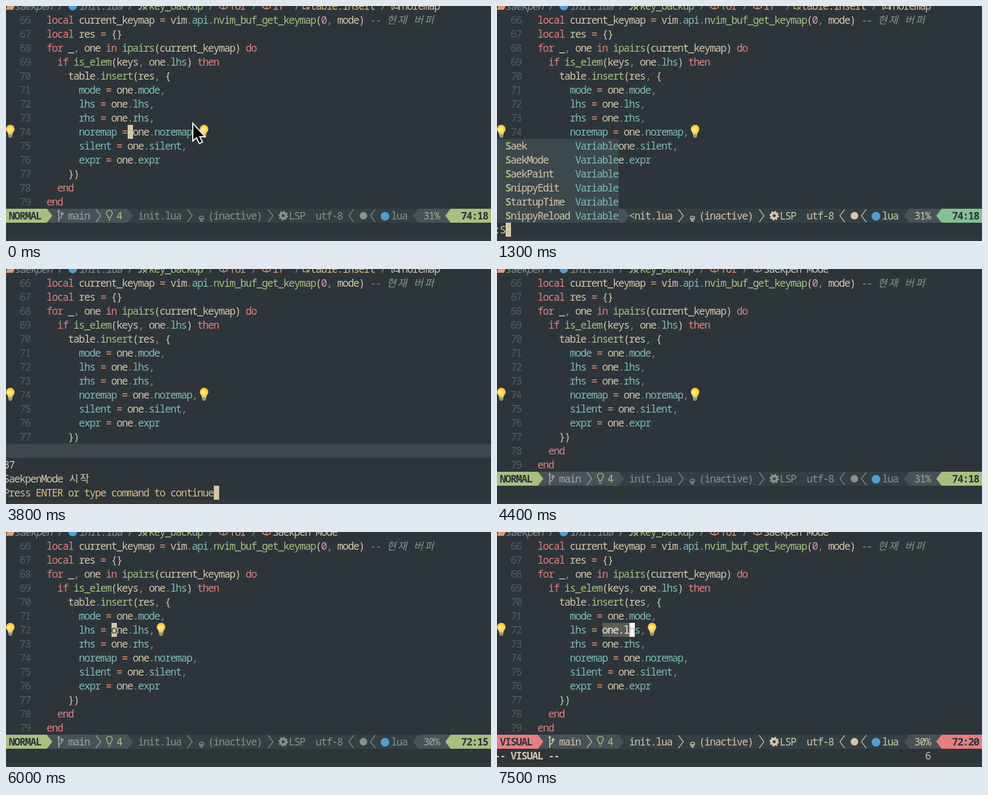
Recreate the animation shown at these times as an HTML page with a canvas. Size 901x437 px, loop 8 s.

```html
<!DOCTYPE html>
<html lang="en">
<head>
<meta charset="utf-8">
<title>Editor session</title>
<style>
  html, body { margin: 0; width: 100%; height: 100%; overflow: hidden; background: #2d353b; }
  canvas { display: block; }
</style>
</head>
<body>
<canvas id="stage" width="901" height="437"></canvas>
<script>
const LOOP = 8000, CELL = 10, ROW = 26, STATUS = 377, CMD = 403;
const C = {
  bg: '#2d353b', bar: '#343f44', panel: '#3d484d', section: '#475258', strip: '#343a3b',
  fg: '#d3c6aa', red: '#e67e80', orange: '#e69875', yellow: '#dbbc7f', green: '#a7c080',
  aqua: '#83c092', blue: '#7fbbb3', purple: '#d699b6', grey: '#859289', soft: '#9da9a0',
  number: '#525c62', moon: '#519fd0', select: '#5b5d57'
};
const ACCENT = { NORMAL: C.green, COMMAND: C.aqua, VISUAL: C.red };

const FIRST = 66;
const CODE = [
  '  local current_keymap = vim.api.nvim_buf_get_keymap(0, mode) -- 현재 버퍼',
  '  local res = {}',
  '  for _, one in ipairs(current_keymap) do',
  '    if is_elem(keys, one.lhs) then',
  '      table.insert(res, {',
  '        mode = one.mode,',
  '        lhs = one.lhs,',
  '        rhs = one.rhs,',
  '        noremap = one.noremap,',
  '        silent = one.silent,',
  '        expr = one.expr',
  '      })',
  '    end',
  '  end'
];
const MENU = {
  S: ['Saek', 'SaekMode', 'SaekPaint', 'SnippyEdit', 'StartupTime', 'SnippyReload'],
  Sa: ['Saek', 'SaekMode', 'SaekPaint', 'StartupTime', 'SnippyReload']
};

// Each step lists only what changes at that time.
const STEPS = [
  [0, { mode: 'NORMAL', line: 74, col: 18, bulb: 74, pointer: true }],
  [400, { cmd: ':', pointer: false }],
  [500, { mode: 'COMMAND' }],
  [1000, { dark: true }],
  [1200, { cmd: ':S', dark: false }],
  [1300, { query: 'S' }],
  [1600, { cmd: ':Sa' }],
  [1700, { query: 'Sa' }],
  [2200, { cmd: ':Saek', pick: 'Saek' }],
  [2400, { cmd: ':SaekMode', pick: 'SaekMode' }],
  [2800, { cmd: '', query: '', prompt: true }],
  [3400, { dark: true }],
  [3800, { dark: false }],
  [3900, { prompt: false, mode: 'NORMAL', started: true }],
  [4400, { dark: true }],
  [4600, { dark: false, line: 73, bulb: 0 }],
  [4700, { bulb: 73 }],
  [5100, { line: 72, bulb: 0 }],
  [5200, { bulb: 72 }],
  [5500, { col: 17, bulb: 0 }],
  [5600, { bulb: 72 }],
  [5700, { col: 16, bulb: 0 }],
  [5800, { bulb: 72 }],
  [5900, { col: 15, bulb: 0 }],
  [6000, { bulb: 72 }],
  [6500, { visual: 15 }],
  [6600, { mode: 'VISUAL' }],
  [6700, { col: 16, bulb: 0 }],
  [6900, { col: 17 }],
  [7100, { col: 18 }],
  [7200, { bulb: 72 }],
  [7300, { col: 19, bulb: 0 }],
  [7400, { col: 20 }],
  [7500, { bulb: 72 }]
];

const ctx = document.getElementById('stage').getContext('2d');
const lineTop = n => 13 + (n - FIRST) * ROW;
const colX = col => 46 + col * CELL;

function rect(x, y, w, h, color) {
  ctx.fillStyle = color;
  ctx.fillRect(x, y, w, h);
}

function disc(x, y, r, color) {
  ctx.fillStyle = color;
  ctx.beginPath();
  ctx.arc(x, y, r, 0, Math.PI * 2);
  ctx.fill();
}

function fill(d, color) {
  ctx.fillStyle = color;
  ctx.fill(new Path2D(d));
}

function stroke(d, color, width = 1.5) {
  ctx.strokeStyle = color;
  ctx.lineWidth = width;
  ctx.stroke(new Path2D(d));
}

// Writes on the terminal grid: Hangul takes two cells, everything else one.
function put(text, x, top, color, style = '') {
  ctx.font = `${style} 19px "Noto Sans Mono", "Noto Sans CJK KR", monospace`;
  ctx.textAlign = 'center';
  ctx.fillStyle = color;
  for (const ch of text) {
    const width = /[가-힣]/.test(ch) ? 2 * CELL : CELL;
    if (ch !== ' ') ctx.fillText(ch, x + width / 2, top + 20);
    x += width;
  }
}

function tokenColor(token, line, at) {
  const rest = line.slice(at + token.length);
  if (/^(local|for|in|do|if|then|end)$/.test(token)) return C.red;
  if (/^\d/.test(token)) return C.purple;
  if (token === '=') return C.orange;
  if (/^[.,]$/.test(token)) return C.grey;
  if (/^\w/.test(token)) {
    if (rest[0] === '(') return C.green;
    if (line[at - 1] === '.') return C.blue;
    if (!line.slice(0, at).trim() && rest.startsWith(' =')) return C.blue;
  }
  return C.fg;
}

function codeLine(line, top) {
  for (const { 0: token, index } of line.matchAll(/--.*|\w+|[^\w\s]/g)) {
    const comment = token.startsWith('--');
    put(token, colX(index + 1), top, comment ? C.grey : tokenColor(token, line, index), comment ? 'italic' : '');
  }
}

function lightBulb(x, top) {
  const glow = ctx.createRadialGradient(x - 2, top + 8, 1, x, top + 10, 9);
  glow.addColorStop(0, '#fff3a0');
  glow.addColorStop(.5, '#fddb55');
  glow.addColorStop(1, '#f7b92d');
  fill(`M${x - 4} ${top + 18}Q${x - 4} ${top + 15} ${x - 6} ${top + 13}A8 8 0 1 1 ${x + 6} ${top + 13}Q${x + 4} ${top + 15} ${x + 4} ${top + 18}Z`, glow);
  fill(`M${x - 4} ${top + 18}h8v3l-2 3h-4l-2 -3Z`, '#87979f');
}

function cube(x) {
  stroke(`M${x + 1} -3L${x + 8} -6L${x + 15} -3V3L${x + 8} 6L${x + 1} 3ZM${x + 1} -3L${x + 8} -1L${x + 15} -3M${x + 8} -1V6`, C.orange);
}

function breadcrumb(started) {
  const top = -13;
  const slash = x => put('/', x, top, C.grey);
  fill('M3 -2H17L13 7H0Z', C.orange);
  put('saekpen', 16, top, C.grey, 'italic');
  slash(96);
  disc(124, 0, 8, C.moon);
  put('init.lua', 136, top, C.grey, 'italic');
  slash(226);
  stroke('M246 6H249Q251 6 251 2V-6M254 0L262 7M262 0L254 7', C.green, 1.8);
  put('key_backup', 266, top, C.green);
  slash(376);
  cube(396);
  put('for', 416, top, C.orange);
  slash(456);
  cube(476);
  if (started) {
    put('Saekpen Mode', 496, top, C.fg);
    return;
  }
  put('if', 496, top, C.orange);
  slash(536);
  stroke('M552 -5V5H557M552 -1H562M558 2L564 6M564 1L558 7', C.yellow);
  put('table.insert', 566, top, C.yellow);
  slash(696);
  stroke('M720 -5H717V6H720M728 -5H731V6H728M721 0L725 -2L729 0V4H721Z', C.fg);
  put('noremap', 736, top, C.fg);
}

const wedge = (x, dir, color) => fill(`M${x} ${STATUS}l${10 * dir} 13l${-10 * dir} 13Z`, color);
const chevron = (x, dir, color) => stroke(`M${x} ${STATUS + 1}l${9 * dir} 12l${-9 * dir} 12`, color, 1.3);

function gear(x, y, color) {
  const ring = (r, width, dash) => {
    ctx.setLineDash(dash);
    ctx.lineWidth = width;
    ctx.beginPath();
    ctx.arc(x, y, r, 0, Math.PI * 2);
    ctx.stroke();
  };
  ctx.strokeStyle = color;
  ring(5, 4.5, []);
  ring(7.5, 3, [7.5 * Math.PI / 8]);
  ctx.setLineDash([]);
}

function statusLine({ mode, line, col }) {
  const accent = ACCENT[mode], calm = mode === 'NORMAL';
  const inner = calm ? C.soft : C.fg, outer = calm ? C.grey : C.fg;
  const shift = (mode.length - 6) * CELL;
  const say = (text, x, color, style) => put(text, x, STATUS, color, style);

  rect(0, STATUS, 901, ROW, C.bar);
  rect(0, STATUS, 226 + shift, ROW, C.section);
  wedge(226 + shift, 1, C.section);
  rect(0, STATUS, 76 + shift, ROW, accent);
  wedge(76 + shift, 1, accent);
  say(mode, 6, C.bg, 'bold');

  ctx.save();
  ctx.translate(shift, 0);
  stroke('M98 380V401M98 395Q104 394 104 386M101 388L104 384L107 388M96 383L98 380L100 383', inner, 1.8);
  say('main', 116, inner);
  chevron(167, 1, inner);
  stroke('M190 394Q190 391 188 389A5.5 5.5 0 1 1 196 389Q194 391 194 394ZM190 398H194', C.green, 1.6);
  say('4', 206, C.green);
  ctx.restore();

  say(mode === 'COMMAND' ? '<nit.lua' : 'init.lua', 246, outer);
  chevron(337, 1, outer);
  stroke('M366 391H361Q358 393 360 397Q363 400 366 396Q368 393 366 391M360 397Q362 393 367 397M361 400H366', outer, 1.5);
  say('(inactive)', 376, outer);
  chevron(487, 1, outer);
  gear(515, 390, outer);
  say('LSP', 526, outer);
  say('utf-8', 576, outer);
  chevron(646, -1, outer);
  disc(664, 390, 7, outer);
  chevron(686, -1, outer);
  disc(704, 391, 8, C.moon);
  say('lua', 716, outer);

  wedge(766, -1, C.section);
  rect(766, STATUS, 60, ROW, C.section);
  say(`${Math.floor(line / 237 * 100)}%`, 776, inner);
  wedge(826, -1, accent);
  rect(826, STATUS, 75, ROW, accent);
  say(`${line}:${col}`, 846, C.bg, 'bold');
}

function menu(query, pick) {
  const items = MENU[query];
  items.forEach((item, i) => {
    const top = CMD - (items.length - i) * ROW, picked = item === pick;
    let matched = 0;
    rect(0, top, 226, ROW, picked ? C.green : C.panel);
    [...item].forEach((ch, k) => {
      const hit = ch === query[matched];
      if (hit) matched++;
      put(ch, 16 + k * CELL, top, picked ? C.bg : hit ? C.green : C.fg, hit ? 'bold' : '');
    });
    put('Variable', 146, top, picked ? C.bg : C.blue);
  });
}

function enterPrompt() {
  rect(0, 325, 901, 104, C.bg);
  rect(0, 325, 901, ROW, C.panel);
  put('37', -4, 351, C.fg);
  put('SaekpenMode 시작', -4, 377, C.fg);
  put('Press ENTER or type command to continue', -4, CMD, C.yellow);
}

function textCursor({ line, col, visual }) {
  const top = lineTop(line), text = CODE[line - FIRST];
  if (visual) {
    rect(colX(visual), top, (col - visual) * CELL, ROW, C.select);
    put(text.slice(visual - 1, col - 1), colX(visual), top, '#f0eee6');
  }
  rect(colX(col), top, CELL, ROW, visual ? '#ffffff' : C.fg);
  put(text[col - 1], colX(col), top, visual ? '#c5bda8' : C.bg);
}

function draw(s) {
  rect(0, 0, 901, 437, C.bg);
  rect(0, 429, 901, 8, C.strip);
  breadcrumb(s.started);
  CODE.forEach((line, i) => {
    const top = lineTop(FIRST + i);
    put(String(FIRST + i), 26, top, C.number);
    codeLine(line, top);
  });
  if (s.bulb) {
    lightBulb(8, lineTop(s.bulb));
    lightBulb(colX(CODE[s.bulb - FIRST].length + 1) + 12, lineTop(s.bulb));
  }
  statusLine(s);

  if (s.prompt) enterPrompt();
  if (s.query) menu(s.query, s.pick);
  if (s.cmd) put(s.cmd, -4, CMD, C.fg);
  if (s.visual) {
    put('-- VISUAL --', -4, CMD, C.fg, 'bold');
    put(String(s.col - s.visual + 1), 796, CMD, C.fg);
  }

  if (!s.dark) {
    if (s.prompt) rect(386, CMD, CELL, ROW, C.fg);
    else if (s.cmd) rect(s.cmd.length * CELL - 4, CMD, CELL, ROW, C.fg);
    else textCursor(s);
  }
  if (s.pointer) {
    const arrow = 'M347 218V251L354 245L359 256L365 253L360 243H370Z';
    fill(arrow, '#000');
    stroke(arrow, '#fff', 2);
  }
}

let shown = -1;
const start = performance.now();
function tick() {
  const t = (performance.now() - start) % LOOP;
  const step = STEPS.findLastIndex(([at]) => at <= t);
  if (step !== shown) {
    shown = step;
    draw(Object.assign({}, ...STEPS.slice(0, step + 1).map(([, change]) => change)));
  }
  requestAnimationFrame(tick);
}
tick();
</script>
</body>
</html>
```
